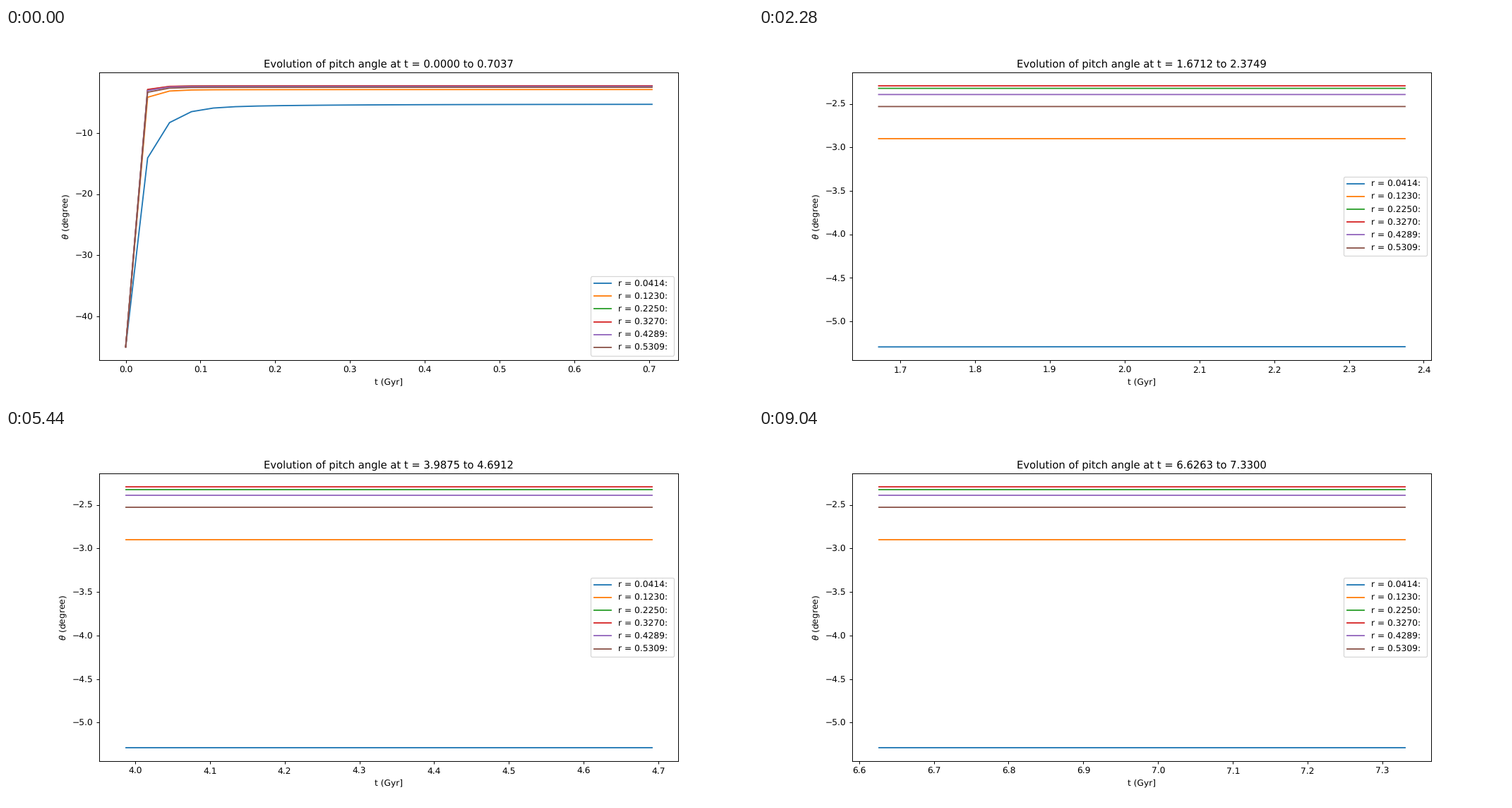
A matplotlib script for the animation above (9.08 s loop, 1058 px wide and 529 px high).

```python
import numpy as np
import matplotlib.pyplot as plt
from matplotlib.animation import FuncAnimation

FRAMES, INTERVAL = 227, 40
DT = 0.02932       # Gyr per step
WINDOW = 25        # points shown at once

step = np.arange(FRAMES + WINDOW)
time = step * DT
radii = 0.00066 + 0.010197 * np.r_[4, 12:53:10]
final_angles = [5.290, 2.900, 2.322, 2.293, 2.393, 2.531]


def pitch(final):
    """Start at -45 degrees and relax to -final; steeper ends settle later."""
    j = step - 1
    first = 0.0455 * final ** 3.16
    slow = 0.014 * np.exp(-j / 4) + 0.0033 * np.exp(-j / 14)
    angle = -final - first * (0.91 * (0.056 * final) ** j + final * slow)
    angle[0] = -45
    return angle


angles = [pitch(final) for final in final_angles]

plt.rcParams["text.hinting"] = "none"
fig, ax = plt.subplots(figsize=(12, 6), dpi=1058 / 12)
lines = [ax.plot([], [], label=f"r = {r:.4f}: ")[0] for r in radii]
ax.set_xlabel("t (Gyr]")
ax.set_ylabel(r"$\theta$ (degree)")
title = ax.set_title("")
ax.legend(loc="best", labelspacing=0.535)


def update(i):
    view = slice(i, i + WINDOW)
    for line, angle in zip(lines, angles):
        line.set_data(time[view], angle[view])
    ax.relim()
    ax.autoscale_view()
    start, end = time[view][[0, -1]]
    title.set_text(f"Evolution of pitch angle at t = {start:.4f} to {end:.4f}")
    return [*lines, title]


anim = FuncAnimation(fig, update, frames=FRAMES, interval=INTERVAL,
                     init_func=lambda: update(0), repeat=True)
plt.show()
```
